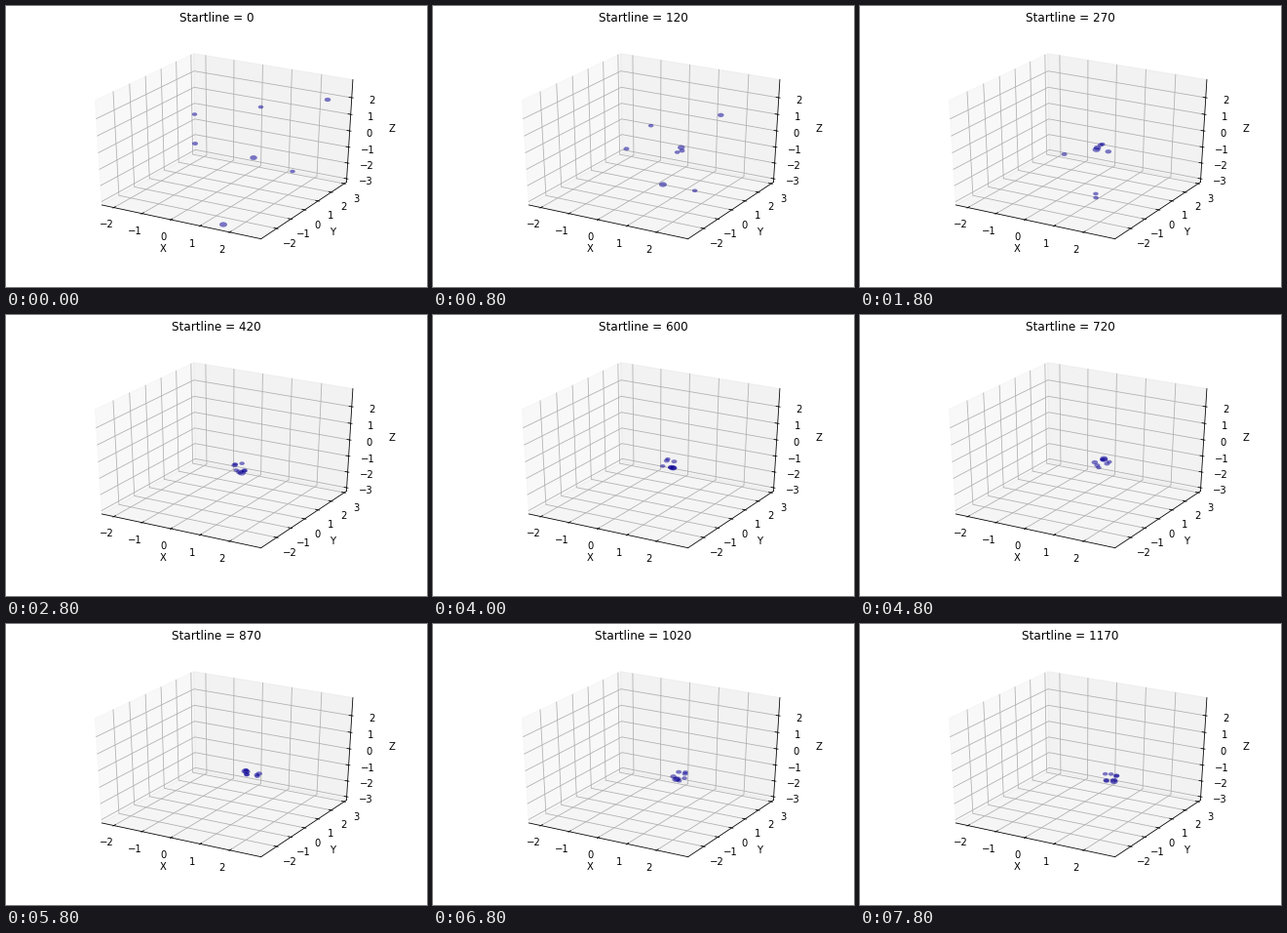
These frames come from a looping animation (432 px wide and 288 px high, 8000 ms). A matplotlib script:

```python
import numpy as np
import matplotlib.pyplot as plt
from matplotlib.animation import FuncAnimation
from matplotlib.patches import Ellipse, Polygon

W, H, DPI = 432, 288, 72
FRAMES, STEP_MS, LINES_PER_FRAME = 40, 200, 30
LIMITS = [(-2.32, 2.925), (-2.95, 3.06), (-3.09, 2.93)]
LO, HI = -25 / 48, 25 / 48          # walls, measured from the cube's centre
LABEL_GAP, NAME_GAP = 0.0833, 0.1811

plt.rcParams["font.family"] = "DejaVu Sans"
fig = plt.figure(figsize=(W / DPI, H / DPI), dpi=DPI, facecolor="white")
ax = fig.add_axes([0, 0, 1, 1])
ax.set(xlim=(0, W), ylim=(H, 0))
ax.axis("off")


def project(p):
    """Perspective view of the unit cube, elevation 30, azimuth -60."""
    x, y, z = p
    s = np.sqrt(3) / 2
    depth = 10 - (s * x / 2 - 0.75 * y + z / 2)
    right = (s * x + y / 2) / depth
    up = (-x / 4 + s * y / 2 + s * z) / depth
    return 225.92 + right * 1809.7, 140.35 - up * 1175.3


def line(points, color, z):
    xs, ys = zip(*map(project, points))
    ax.plot(xs, ys, color=color, lw=0.8, zorder=z, solid_capstyle="projecting")


def put(point, i, value):
    """Copy of a point with coordinate i replaced."""
    out = list(point)
    out[i] = value
    return out


def draw_wall(fixed, side, grey):
    """The wall on which coordinate `fixed` equals `side`."""
    corners = [(LO, LO), (LO, HI), (HI, HI), (HI, LO)]
    points = [project(np.insert(c, fixed, side)) for c in corners]
    ax.add_patch(Polygon(points, color=[grey] * 3, alpha=0.5, lw=1, zorder=1))


def draw_axis(i, edge, tick_dir, name):
    """Axis line, ticks, grid and labels; edge holds the fixed coordinates."""
    line([put(edge, i, LO), put(edge, i, HI)], "black", 3)
    a, b = [k for k in range(3) if k != i]
    back, far = (LO, HI, LO), (HI, LO, HI)

    def outward(at, gap):
        return project([at if k == i else e + np.sign(e) * gap
                        for k, e in enumerate(edge)])

    low, high = LIMITS[i]
    for value in range(int(np.ceil(low)), int(high) + 1):
        at = (value - low) / (high - low) - 0.5
        corner = put(back, i, at)
        line([put(corner, a, far[a]), corner, put(corner, b, far[b])], "#b0b0b0", 2)
        foot = put(edge, i, at)
        unit = np.sign(edge[tick_dir]) / 12
        line([put(foot, tick_dir, edge[tick_dir] + r * unit) for r in (0.1, -0.2)],
             "black", 3)
        ax.text(*outward(at, LABEL_GAP), str(value).replace("-", "\u2212"),
                size=10, ha="center", va="top")
    ax.text(*outward(0, NAME_GAP), name, size=10, ha="center", va="center")


draw_wall(0, LO, 0.95)
draw_wall(1, HI, 0.90)
draw_wall(2, LO, 0.925)
draw_axis(0, (0, LO, LO), 1, "X")
draw_axis(1, (HI, 0, LO), 0, "Y")
draw_axis(2, (HI, HI, 0), 0, "Z")
title = ax.text(216, 5.76, "", size=12, ha="center", va="top")

# Start on the stage and width of each body; the last one hides behind the second
BODIES = [(223, 224, 8), (254, 155.5, 7.5), (330, 96, 6.5), (194, 141, 6),
          (193.5, 111, 5.5), (261.5, 103.5, 5.5), (294, 169.5, 5.5), (254, 155.5, 6)]
MEET = 6                            # frame at which the fall ends
# Bodies that swing wide first: turning point and frame of joining the group
SWING = {3: (204, 153, 14), 5: (237, 208, 12), 6: (237, 214, 12)}

rng = np.random.default_rng(4)
count = len(BODIES)
phase = 2 * np.pi * (np.arange(count) + rng.uniform(-0.3, 0.3, count)) / count
reach = rng.uniform(0.45, 1, count)
speed = rng.uniform(0.5, 1.0, count)


def group_centre(n):
    times = [6, 13, 18, 26, 39]
    return np.array([np.interp(n, times, [256, 241, 240, 251, 256]),
                     np.interp(n, times, [136, 158, 152.5, 152, 157.5])])


def fall(a, b, u):
    """Accelerating move from a to b."""
    return a + (b - a) * np.clip(u, 0, 1) ** 2


def place(j, n):
    angle = phase[j] + speed[j] * n
    goal = group_centre(n) + reach[j] * np.array([8 * np.cos(angle), 5.5 * np.sin(angle)])
    start = np.array(BODIES[j][:2])
    if j not in SWING:
        return fall(start, goal, n / MEET)
    x, y, join = SWING[j]
    if n <= MEET:
        return fall(start, np.array([x, y]), n / MEET)
    return fall(np.array([x, y]), goal, (n - MEET) / (join - MEET))


dots = [ax.add_patch(Ellipse((x, y), w, w / 1.54, fc=(0.03, 0, 0.58), alpha=0.52,
                             lw=0, zorder=4)) for x, y, w in BODIES]


def update(n):
    title.set_text(f"Startline = {n * LINES_PER_FRAME}")
    for j, dot in enumerate(dots):
        dot.center = place(j, n)
    dots[-1].set_visible(n > 0)
    return [title, *dots]


anim = FuncAnimation(fig, update, frames=FRAMES, interval=STEP_MS, repeat=True, repeat_delay=0)
plt.show()
```
